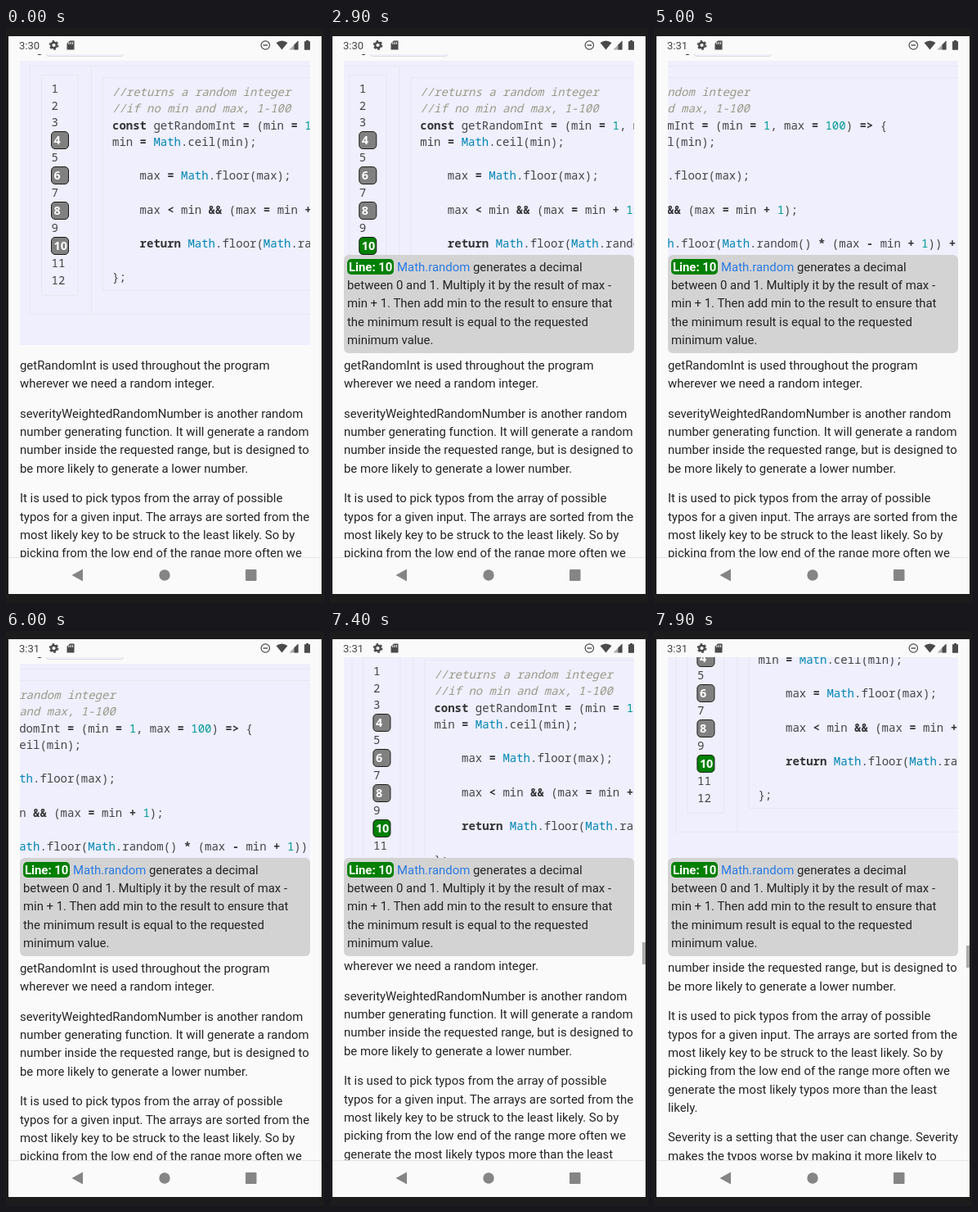
An HTML page for the animation above (8 s loop, 389 by 702 pixels).

```html
<!DOCTYPE html>
<html lang="en">
<head>
<meta charset="utf-8">
<title>Code annotations on a phone</title>
<style>
html, body { margin: 0; width: 100%; height: 100%; overflow: hidden; background: #1c1c1c; }
.stage, .stage div, .stage svg { position: absolute; }
.stage {
  left: 0; top: 0; width: 389px; height: 702px; overflow: hidden; background: #1c1c1c;
  font: 14.9px/22.34px Roboto, sans-serif; color: #242424;
  --loop: 8s step-end -4ms infinite;
}
.screen { left: 3px; top: 10px; width: 383px; height: 681px; background: #fafafa; }
.page { left: 3px; top: 32px; width: 383px; height: 614px; overflow: hidden; }
.scroll { left: -3px; top: -32px; animation: scroll-y var(--loop); }

.tag { left: 49px; top: 14px; width: 93px; height: 19px; border: 1px solid #dcdce0; border-radius: 3px; background: #f0f0fb; }
.tail { left: 37px; top: 14px; }
.code { left: 17px; top: 39.5px; width: 355px; height: 347px; overflow: hidden; background: #efeffd; }
.wide { left: -17px; top: -39.5px; width: 700px; height: 400px; animation: scroll-x var(--loop); }
.box { box-sizing: border-box; border: 1px solid #e8e8f0; }
pre, .lines { position: absolute; margin: 0; font: 14px/20.55px "Noto Sans Mono", monospace; color: #444448; }
pre { left: 130px; top: 67.7px; }
pre b { color: #333337; }
pre i { color: #999988; }
.num { color: #009999; }
.lib { color: #0086b3; }
.lines { left: 55.6px; top: 64.2px; }
.lines span { display: block; }
.lines b {
  display: block; box-sizing: border-box; width: 22.4px; height: 22.4px; margin-left: -.6px; padding-left: 2.5px;
  border: 1.5px solid #1a1a1a; border-radius: 5px; background: #808080; color: #fff;
  font: bold 14.3px/19.4px "Noto Sans", sans-serif;
}
.lines .active { animation: activate var(--loop); }

.text { left: 17px; top: 401.1px; white-space: pre; }
.text p { margin: 0 0 14px; }

.note {
  left: 17px; top: 276.5px; width: 355px; box-sizing: border-box; padding: 4px; overflow: hidden;
  border-radius: 6px; background: #d3d3d3; white-space: pre; animation: open var(--loop);
}
.note b { padding: 1px 2px 0; border-radius: 5px; background: #008000; color: #fff; }
.note span { color: #2a7ae2; }
.thumb { left: 382px; top: 379.5px; width: 4px; height: 27px; background: #acacac; animation: thumb var(--loop); }

.clock { left: 16px; top: 13.5px; font-size: 13px; line-height: 16px; color: #444; }
.clock span { position: absolute; }
.before { animation: hide var(--loop); }
.after { animation: show var(--loop); }
.nav { left: 3px; top: 646px; width: 383px; height: 44px; border-top: 1px solid #e4e4e4; background: #fafafa; }
svg { left: 0; top: 0; }

@keyframes scroll-x {
  0% { transform: none; }
  36.25% { transform: translateX(0); animation-timing-function: steps(8, start); }
  46.25% { transform: translateX(-158px); }
  60% { transform: translateX(-158px); animation-timing-function: steps(3, start); }
  63.75% { transform: translateX(-231.4px); animation-timing-function: steps(4, start); }
  68.75% { transform: translateX(-262px); }
  72.5% { transform: translateX(-262px); animation-timing-function: steps(3, start); }
  76.25% { transform: translateX(-214.6px); animation-timing-function: steps(6, start); }
  83.75%, 100% { transform: translateX(-2.6px); }
}
@keyframes scroll-y {
  0% { transform: translateY(0); }
  92.5% { transform: translateY(-9.2px); animation-timing-function: steps(6, start); }
  100% { transform: translateY(-104px); }
}
@keyframes thumb {
  0% { opacity: 0; transform: translateY(0); }
  92.5% { opacity: 1; transform: translateY(-.7px); animation-timing-function: steps(6, start); }
  100% { opacity: 1; transform: translateY(3.5px); }
}
@keyframes open {
  0% { visibility: hidden; height: 29px; }
  18.75% { visibility: visible; height: 29px; }
  20%, 100% { visibility: visible; height: 120.5px; }
}
@keyframes activate { 0% { background: #808080; } 18.75%, 100% { background: #008000; } }
@keyframes hide { 0% { opacity: 1; } 51.25%, 100% { opacity: 0; } }
@keyframes show { 0% { opacity: 0; } 51.25%, 100% { opacity: 1; } }
</style>
</head>
<body>
<div class="stage">
  <div class="screen"></div>
  <div class="page">
    <div class="scroll">
      <div class="tail">g</div>
      <div class="tag"></div>
      <div class="code">
        <div class="wide">
          <div class="box" style="left:29px;top:46px;width:640px;height:304px"></div>
          <div class="box" style="left:104px;top:46px;width:565px;height:304px"></div>
          <div class="box" style="left:43px;top:57px;width:46px;height:270px"></div>
          <div class="box" style="left:118px;top:60px;width:537px;height:261px"></div>
          <div class="lines"><span>1</span><span>2</span><span>3</span><b>4</b><span>5</span><b>6</b><span>7</span><b>8</b><span>9</span><b class="active">10</b><span>11</span><span>12</span></div>
<pre><i>//returns a random integer</i>
<i>//if no min and max, 1-100</i>
<b>const</b> getRandomInt <b>=</b> (min <b>=</b> <span class="num">1</span>, max <b>=</b> <span class="num">100</span>) <b>=&gt;</b> {
min <b>=</b> <span class="lib">Math</span>.ceil(min);

    max <b>=</b> <span class="lib">Math</span>.floor(max);

    max <b>&lt;</b> min <b>&amp;&amp;</b> (max <b>=</b> min <b>+</b> <span class="num">1</span>);

    <b>return</b> <span class="lib">Math</span>.floor(<span class="lib">Math</span>.random() <b>*</b> (max <b>-</b> min <b>+</b> <span class="num">1</span>)) <b>+</b> min;

};</pre>
        </div>
      </div>
      <div class="text"><p>getRandomInt is used throughout the program
wherever we need a random integer.</p><p>severityWeightedRandomNumber is another random
number generating function. It will generate a random
number inside the requested range, but is designed to
be more likely to generate a lower number.</p><p>It is used to pick typos from the array of possible
typos for a given input. The arrays are sorted from the
most likely key to be struck to the least likely. So by
picking from the low end of the range more often we
generate the most likely typos more than the least
likely.</p><p>Severity is a setting that the user can change. Severity
makes the typos worse by making it more likely to</p></div>
    </div>
  </div>
  <div class="note"><b>Line: 10</b> <span>Math.random</span> generates a decimal
between 0 and 1. Multiply it by the result of max -
min + 1. Then add min to the result to ensure that
the minimum result is equal to the requested
minimum value.</div>
  <div class="thumb"></div>
  <div class="nav"></div>
  <div class="clock">3:3<span class="before">0</span><span class="after">1</span></div>
  <svg width="389" height="702" fill="#4a4a4a">
    <g fill="none" stroke="#4a4a4a">
      <circle cx="58.5" cy="21" r="3.3" stroke-width="2.4"/>
      <circle cx="58.5" cy="21" r="5" stroke-width="1.8" stroke-dasharray="2.6 2.636"/>
      <circle cx="317.3" cy="21" r="5.2" stroke-width="1.2"/>
      <path d="M314.5 21h5.6" stroke-width="1.4"/>
    </g>
    <path d="M78 15.5h5.5v11h-9v-7.5z"/>
    <path d="M76.8 17.5v2.5M79 17v3M81.3 17v3" stroke="#fafafa"/>
    <path d="M330.5 18q7-5 14 0l-7 8.5z"/>
    <path d="M357.5 15.5v11h-11z" fill="#aaa"/>
    <path d="M357.5 15.5v11h-5v-6z"/>
    <path d="M367 15h3v1.2h2v10.6h-7V16.2h2z"/>
    <g fill="#858585">
      <path d="M80.5 668l13.5-7.5v15z"/>
      <circle cx="194" cy="668" r="6.7"/>
      <rect x="293" y="661" width="13.5" height="14" rx="1"/>
    </g>
  </svg>
</div>
</body>
</html>
```
